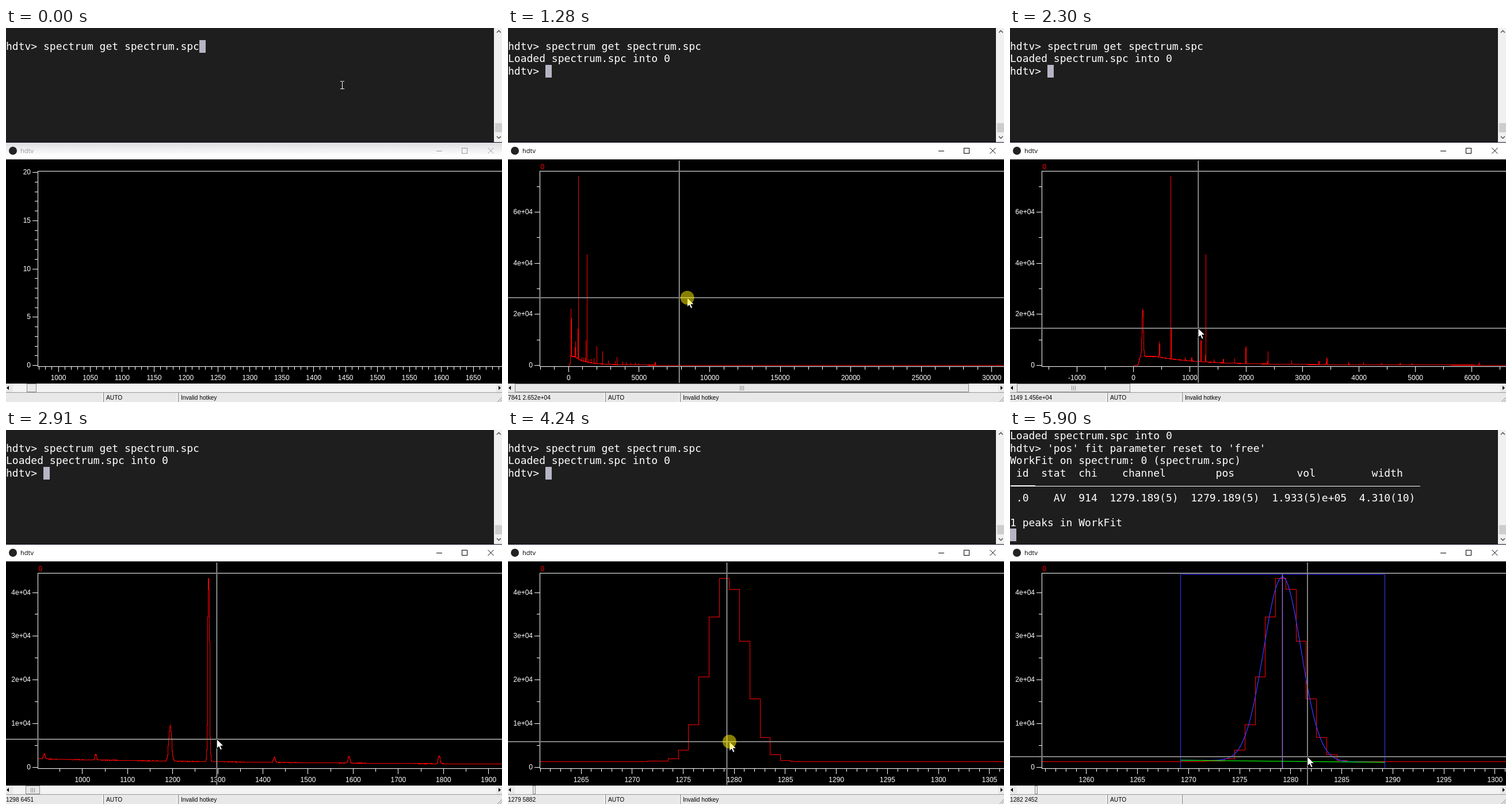
An HTML page with a canvas for the animation above (5.95 s loop, 862 by 649 pixels).

```html
<!DOCTYPE html>
<html lang="en">
<head>
<meta charset="utf-8">
<title>Spectrum viewer</title>
<style>
  html, body { margin: 0; width: 100%; height: 100%; overflow: hidden; background: #000; }
  canvas { display: block; }
</style>
</head>
<body>
<canvas id="stage" width="862" height="649"></canvas>
<script>
const g = document.getElementById('stage').getContext('2d');
const W = 862, H = 649, LOOP = 5950;
const MONO = '18px "DejaVu Sans Mono", monospace';
const SANS = '"Liberation Sans", Arial, sans-serif';
const COL = 10.836, ROW = 21.5;
const LEFT = 56, ZERO_Y = 585.5, PEAK_PX = 328;
const PEAK = 1279.19, SIGMA = 1.83, FULL_SCALE = 0.024511;
const LOADED = 410, FOCUSED = 1100, FITTED = 5200, PRINTED = 5250, PAN_LAG = 24;

// Pointer moves: start time, end time, x, y
const home = [584, 99];
const moves = [
  [560, 1105, 248.2, 468], [1172, 1590, 491.07, 468], [1660, 1790, 466, 482], [2020, 2200, 327, 520.9],
  [2300, 2390, 338.2, 530], [2909, 2910, 366.4, 536.56], [2920, 3200, 345.2, 546],
  [3560, 3790, 340.5, 547.3], [3810, 3910, 371.78, 541], [4170, 4730, 475, 539.5], [5640, 5900, 517, 566.9]
];
// What the mouse does to the view: pans by dragging, zooms by wheel clicks
const gestures = [
  { press: 1172, stop: 1590, release: 1690 },
  { at: 2200, clicks: 2, gap: 90, octaves: 1 },
  { at: 2400, clicks: 3, gap: 155, octaves: 1 },
  { at: 3220, clicks: 2, gap: 130, octaves: 1 },
  { at: 3920, clicks: 5, gap: 45, octaves: 0.5 },
  { press: 4170, stop: 4730, release: 4780 }
];

function pointerAt(t) {
  let [x, y] = home;
  for (const [start, end, toX, toY] of moves) {
    const u = Math.min(1, Math.max(0, (t - start) / (end - start)));
    x += (toX - x) * u;
    y += (toY - y) * u;
  }
  return [x, y];
}

const panning = (d, t) => t >= d.press && t < d.stop;
// The viewer trails the pointer while it pans
const panTime = (d, t) => panning(d, t) ? Math.max(d.press, t - PAN_LAG) : Math.min(t, d.stop);

function viewAt(t) {
  let scale = FULL_SCALE, anchor = LEFT + PEAK * scale;
  if (t < LOADED) { scale *= 2 ** 5.5; anchor = 400.7; }
  for (const s of gestures) {
    if (s.press && t >= s.press) anchor += pointerAt(panTime(s, t))[0] - pointerAt(s.press)[0];
    for (let i = 0; i < s.clicks && t >= s.at + i * s.gap; i++) {
      const pivot = pointerAt(s.at + i * s.gap)[0], factor = 2 ** s.octaves;
      anchor = pivot + (anchor - pivot) * factor;
      scale *= factor;
    }
  }
  return { scale, x: c => anchor + (c - PEAK) * scale, channel: px => PEAK + (px - anchor) / scale };
}

// Spectrum: decaying background with noise, a few known lines and some weak random ones
const bell = (d, sigma) => Math.exp(-d * d / (2 * sigma * sigma));
const random = n => { const v = Math.sin(n * 12.9898) * 43758.5453; return v - Math.floor(v); };
const counts = Array.from({ length: 32768 }, (_, c) => {
  const decay = Math.min(3500, 4700 * Math.exp(-c / 700) + 900 * Math.exp(-c / 2800));
  const level = decay / (1 + Math.exp((95 - c) / 8));
  return Math.max(0, level + (random(c) * 2 - 1) * Math.sqrt(level));
});

function addLine(pos, height, sigma = 1.3 + pos / 2400) {
  for (let c = Math.round(pos - 5 * sigma); c < pos + 5 * sigma; c++) counts[c] += height * bell(c - pos, sigma);
}
[
  [160, 18500, 12], [457, 6000, 4], [660, 71450], [915, 1300], [1029, 1300], [1194, 8300, 3.1],
  [1279.3, 42450], [1425, 1200], [1590, 1500], [1790, 1750], [1990, 6700], [2381, 4900], [3425, 2800], [6125, 1000]
].forEach(line => addLine(...line));
for (let i = 0; i < 8; i++) addLine(2800 + i * 300 + random(i) * 200, 1400 - i * 120);

function tallest(view) {
  const end = Math.min(counts.length, view.channel(W));
  let top = 0;
  for (let c = Math.max(0, Math.ceil(view.channel(LEFT))); c < end; c++) top = Math.max(top, counts[c]);
  return top;
}

function rect(color, x, y, w, h) { g.fillStyle = color; g.fillRect(x, y, w, h); }

function disc(color, x, y, r) {
  g.fillStyle = color;
  g.beginPath(); g.arc(x, y, r, 0, 7); g.fill();
}

function text(s, x, y, font, color, align = 'left') {
  g.font = font; g.fillStyle = color; g.textAlign = align;
  g.fillText(s, x, y);
}

function stroke(color, points, width = 1) {
  g.strokeStyle = color; g.lineWidth = width;
  g.beginPath();
  points.forEach(([x, y]) => g.lineTo(x, y));
  g.stroke();
}

function polygon(color, points) {
  g.fillStyle = color;
  g.beginPath();
  points.forEach(([x, y]) => g.lineTo(x, y));
  g.fill();
}

function scientific(v, digits) {
  return v >= 1e4 ? v.toExponential(digits).replace(/e\+(\d)$/, 'e+0$1') : String(Math.round(v));
}

function drawTerminal(t) {
  rect('#1e1e1e', 0, 0, 848, 199);
  const printed = t >= PRINTED;
  const top = printed ? 21 - ROW : 21;
  const put = (row, s) => text(s, 0, Math.floor(top + row * ROW + 17), MONO, '#fff');
  const cursor = (row, col) => rect('#b5b5c5', Math.round(col * COL), Math.floor(top + row * ROW), 11, 22);
  if (printed) {
    put(0, 'Loaded spectrum.spc into 0');
    put(1, "hdtv> 'pos' fit parameter reset to 'free'");
    put(2, 'WorkFit on spectrum: 0 (spectrum.spc)');
    put(3, ' id  stat  chi    channel        pos          vol         width');
    rect('#fff', 1, 97, 712, 1);
    rect('#fff', 1, 96, 43, 2);
    put(5, ' .0    AV  914  1279.189(5)  1279.189(5)  1.933(5)e+05  4.310(10)');
    put(7, '1 peaks in WorkFit');
    cursor(8, 0);
  } else {
    put(0, 'hdtv> spectrum get spectrum.spc');
    if (t >= LOADED) {
      put(1, 'Loaded spectrum.spc into 0');
      put(2, 'hdtv>');
      cursor(2, 6);
    } else if (t >= 360) cursor(1, 0);
    else cursor(0, 31);
  }
  rect('#f0f0f0', 848, 0, 14, 198);
  rect('#cdcdcd', 850, 165, 12, 16);
  stroke('#505050', [[853, 8], [856.5, 4.5], [860, 8]], 1.5);
  stroke('#505050', [[853, 188], [856.5, 191.5], [860, 188]], 1.5);
}

function drawTitle(active) {
  rect('#fff', 0, 199, W, 29);
  rect('#1c1426', 0, 198, W, 1);
  if (!active) {
    const shade = g.createLinearGradient(0, 199, 0, 222);
    shade.addColorStop(0, '#dedee2');
    shade.addColorStop(1, '#fff');
    rect(shade, 0, 199, W, 24);
  }
  const ink = active ? '#000' : '#999';
  disc('#222', 12, 213, 7);
  text('hdtv', 25, 217, '11px "Open Sans", sans-serif', ink);
  rect(ink, 748, 213, 10, 1);
  g.strokeStyle = ink; g.lineWidth = 1;
  g.strokeRect(792.5, 208.5, 9, 9);
  stroke(ink, [[837.5, 208], [847.5, 218]]);
  stroke(ink, [[847.5, 208], [837.5, 218]]);
}

// Smallest 1-2-5 distance that leaves room for labels, with its subdivisions
function tickStep(scale) {
  for (let decade = 1; ; decade *= 10)
    for (const m of [1, 2, 5])
      if (m * decade * scale >= 52) return { minor: m === 5 ? decade : m * decade / 2, per: m === 5 ? 5 : 2 };
}

function eachTick(from, to, scale, draw) {
  const { minor, per } = tickStep(scale);
  for (let i = Math.ceil(from / minor); i * minor <= to; i++) draw(i * minor, i % per === 0);
}

function drawSpectrum({ channel }, y) {
  g.fillStyle = '#f00';
  for (let px = LEFT; px < W; px++) {
    const first = Math.max(0, Math.round(channel(px - 0.5)));
    const last = Math.min(counts.length - 1, Math.round(channel(px + 0.5)));
    let lo = Infinity, hi = -1;
    for (let c = first; c <= last; c++) { lo = Math.min(lo, counts[c]); hi = Math.max(hi, counts[c]); }
    if (hi < 0) continue;
    const top = Math.floor(y(hi));
    g.fillRect(px, top, 1, Math.floor(y(lo)) - top + 1);
  }
  text('0', 56.5, 245, '12px ' + SANS, '#f00');
}

function drawFit({ x }, y) {
  const from = PEAK - 10, to = PEAK + 10, blue = '#3838ff';
  const base = c => 1640 - 23 * (c - from);
  const [left, right] = [from, to].map(c => Math.ceil(x(c)) + 0.5);
  const curve = [];
  for (let c = from; c <= to; c += 0.05) curve.push([x(c), y(base(c) + 42140 * bell(c - PEAK, SIGMA))]);
  stroke(blue, [[left, 587], [left, 250.5], [right, 250.5], [right, 587]]);
  stroke(blue, curve, 1.3);
  stroke('#00f000', [[left, y(base(from))], [right, y(base(to))]], 1.3);
  stroke('#b878ff', [[x(PEAK), 250], [x(PEAK), 587]], 1.2);
}

function drawAxes({ x, channel, scale }, y, yScale) {
  const font = '12px ' + SANS;
  rect('#fff', 55, 248, W, 1);
  rect('#fff', 55, 587, W, 1);
  rect('#fff', 55, 248, 1, 340);
  eachTick(channel(LEFT), channel(W), scale, (v, major) => {
    rect('#fff', Math.floor(x(v)), 588, 1, major ? 9 : 5);
    if (major) text(String(v), x(v), 611, font, '#fff', 'center');
  });
  eachTick(0, (ZERO_Y - 249) / yScale, yScale, (v, major) => {
    const py = Math.floor(y(v));
    rect('#fff', major ? 46 : 50, py, major ? 9 : 5, 1);
    if (major) text(scientific(v, 0), 43, py + 4, font, '#fff', 'right');
  });
}

function drawBars(t, view, status) {
  rect('#e8e8e8', 0, 617, W, 32);
  rect('#f3f3f3', 12, 617, 840, 15);
  const thumb = Math.round(12 + Math.max(0, view.channel(LEFT)) * 0.0248);
  const size = Math.max(5, Math.round((W - LEFT) / view.scale * 0.024));
  rect('#e8e8e8', thumb, 617, size, 15);
  g.strokeStyle = '#8a8a8a'; g.lineWidth = 1;
  g.strokeRect(thumb + 0.5, 617.5, size - 1, 14);
  if (size > 20) for (const d of [-3, 0, 3]) rect('#8a8a8a', Math.floor(thumb + size / 2) + d, 621, 1, 8);
  polygon('#000', [[1, 624.5], [5, 621], [5, 628]]);
  polygon('#000', [[860, 624.5], [856, 621], [856, 628]]);
  rect('#999', 0, 632, W, 1);
  for (const x of [167, 297]) {
    rect('#fff', x, 633, 1, 16);
    rect('#858585', x + 2, 633, 1, 16);
  }
  for (const d of [4, 8]) stroke('#888', [[W - d, H], [W, H - d]]);
  const put = (s, x) => text(s, x, 645, '10.2px ' + SANS, '#000');
  put(status, 0);
  put('AUTO', 174);
  if (t < FITTED) put('Invalid hotkey', 304);
}

function drawCrosshair(x, y) {
  g.globalCompositeOperation = 'difference';
  rect('#fff', x - 0.5, 230, 1, 386);
  rect('#fff', 0, y - 0.5, W, 1);
  g.globalCompositeOperation = 'source-over';
}

function drawPointer(x, y, pressed) {
  if (y < 198) {
    rect('#fff', x, y - 6, 1, 13);
    for (const dy of [-7, 6]) for (const dx of [-3, 1]) rect('#fff', x + dx, y + dy, 3, 1);
    return;
  }
  const arrow = [[0, 0], [0, 16], [3.7, 12.6], [6.4, 18.6], [9, 17.4], [6.4, 11.6], [11.5, 11.5], [0, 0]]
    .map(([dx, dy]) => [x + dx, y + dy]);
  polygon('#fff', arrow);
  stroke('#000', arrow, 0.8);
  if (pressed) disc('rgba(255, 240, 0, 0.53)', x, y, 12);
}

function render(t) {
  const loaded = t >= LOADED;
  const drag = gestures.find(s => t >= s.press && t < s.release);
  const pointer = pointerAt(t);
  const [cx, cy] = drag && panning(drag, t) ? pointerAt(panTime(drag, t)) : pointer;
  const view = viewAt(t);
  const yScale = loaded ? PEAK_PX / tallest(view) : 16.75;
  const y = v => ZERO_Y - v * yScale;
  const inPlot = loaded && cy >= 229;
  const status = inPlot ? Math.round(view.channel(cx)) + ' ' + scientific((ZERO_Y - cy) / yScale, 3) : '';

  drawTerminal(t);
  drawTitle(t >= FOCUSED);
  rect('#000', 0, 228, W, 389);
  if (loaded) drawSpectrum(view, y);
  if (t >= FITTED) drawFit(view, y);
  drawAxes(view, y, yScale);
  drawBars(t, view, status);
  if (inPlot) drawCrosshair(cx, cy);
  drawPointer(...pointer, !!drag);
}

const begin = performance.now();
function tick() {
  render((performance.now() - begin) % LOOP);
  requestAnimationFrame(tick);
}
tick();
</script>
</body>
</html>
```
